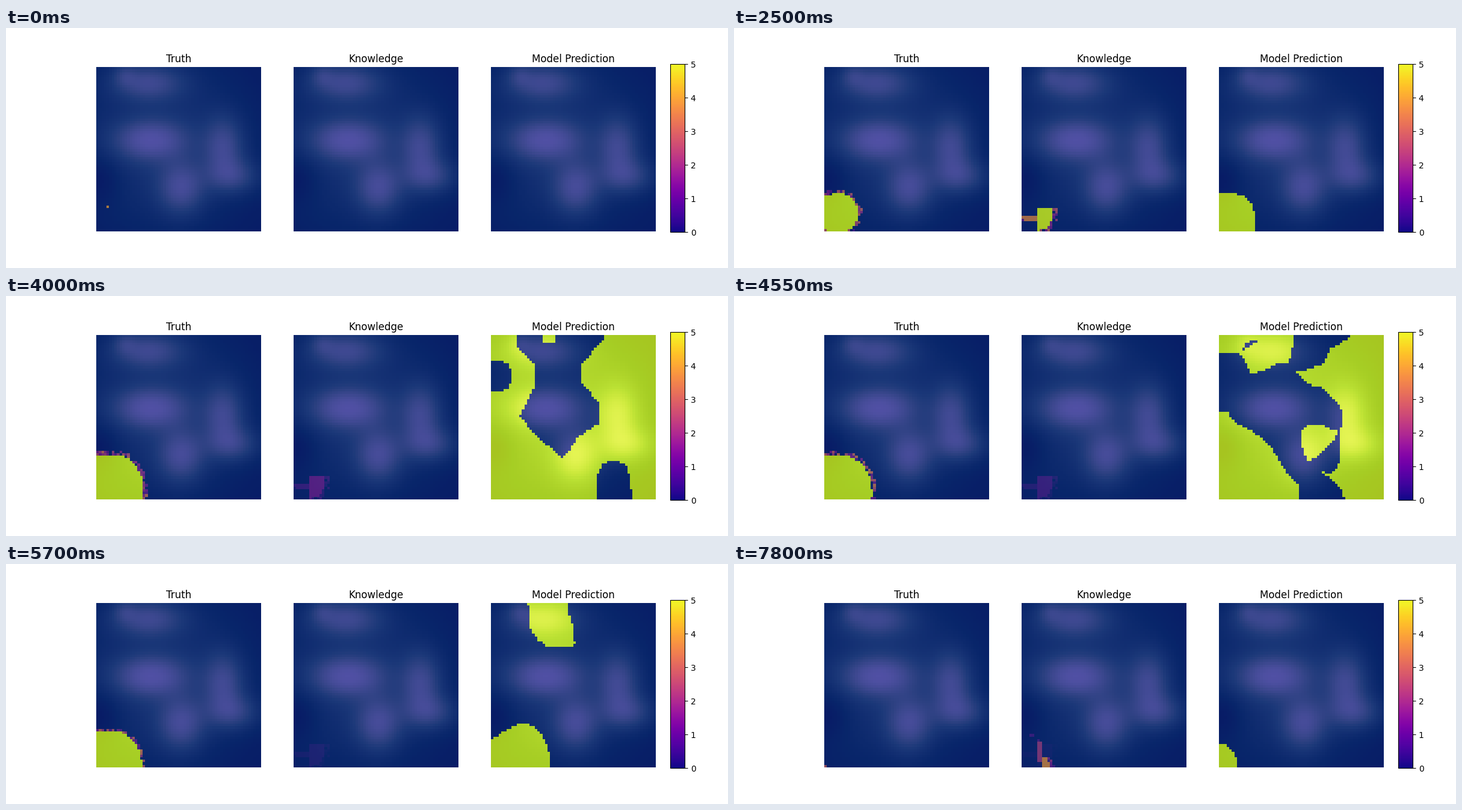
A matplotlib script that plays this animation: 1200 px wide and 400 px high, repeating every 7850 ms.

```python
import numpy as np
import matplotlib.pyplot as plt
from matplotlib.animation import FuncAnimation
from matplotlib.colors import Normalize
from matplotlib.path import Path

SIZE = 64
FRAMES = 157
INTERVAL = 50
MEMORY = 21  # frames until a sensed value has halved
X, Y = np.meshgrid(np.arange(SIZE) + 0.5, np.arange(SIZE) + 0.5)


# Regions are depth fields: positive inside, negative outside, in cells.
def blob(cx, cy, rx, ry, power=2.3):
    q = np.abs((X - cx) / rx) ** power + np.abs((Y - cy) / ry) ** power
    return (1 - q ** (1 / power)) * min(rx, ry)


def outline(*corners):
    corners = np.array(corners, float)
    points = np.column_stack([X.ravel(), Y.ravel()])
    inside = Path(corners).contains_points(points)
    nearest = np.full(len(points), np.inf)
    for a, b in zip(corners, np.roll(corners, -1, axis=0)):
        t = np.clip((points - a) @ (b - a) / ((b - a) @ (b - a)), 0, 1)
        gap = points - a - t[:, None] * (b - a)
        nearest = np.minimum(nearest, np.hypot(*gap.T))
    return np.where(inside, nearest, -nearest).reshape(X.shape)


def union(*regions):
    return np.maximum.reduce(regions)


def all_but(*regions):
    return -union(*regions)


def vegetation():
    def clearing(x, y, w, h, strength):
        return strength * np.exp(-((X - x) / w) ** 2 / 2 - ((Y - y) / h) ** 2 / 2)

    light = (clearing(25, 30, 26, 25, 0.3)
             + clearing(21, 28.5, 9.5, 5.2, 0.63)
             + clearing(20, 6, 9.5, 4.8, 0.5)
             + clearing(11, 3, 3, 3, 0.2)
             + clearing(49.5, 31, 5.3, 8, 0.5)
             + clearing(53, 42.5, 7, 4.6, 0.42)
             + clearing(33, 47, 6, 7, 0.54)
             - clearing(2, 43, 6, 7, 0.14))
    return 1 - np.clip(light, 0, 1)


# Fire outline over time: frame, centre x, centre y, radius x, radius y
FIRE = np.array([
    (0, 4.5, 54.5, 0.6, 0.6),
    (50, 5.3, 56.8, 7.6, 7.6),
    (80, 5, 61, 13.2, 14.4),
    (102, 5, 62, 13.9, 15),
    (128, 2, 64, 14, 11.4),
    (139, 0, 64, 11.7, 6.5),
    (156, 0.5, 63.5, 0.6, 0.6),
])


def truth(frame):
    depth = blob(*(np.interp(frame, FIRE[:, 0], col) for col in FIRE.T[1:]))
    peak = np.interp(frame, [0, 8, 150, 156], [3.5, 5, 5, 2.5])
    fringe = np.interp(frame, [0, 15, 90, 102, 150, 156],
                       [0.1, 1.8, 1.5, 1, 1, 0])
    rng = np.random.default_rng(frame)
    embers = rng.uniform(0.7, 3, X.shape) * (rng.random(X.shape) < 0.65)
    return np.where(depth > 0, peak, np.where(depth > -fringe, embers, 0))


def sweep(frame, c0, c1, r0, r1):
    """What a sensor pass over columns c0..c1, rows r0..r1 picks up."""
    seen = np.zeros((SIZE, SIZE))
    seen[r0:r1, c0:c1] = truth(frame)[r0:r1, c0:c1]
    return frame, seen


SWEEPS = [
    sweep(33, 0, 6, 58, 60), sweep(46, 6, 14, 55, 64),
    sweep(127, 0, 8, 51, 52), sweep(130, 6, 8, 52, 62),
    sweep(140, 8, 13, 60, 64),
]


def knowledge(frame):
    known = np.zeros((SIZE, SIZE))
    for start, seen in SWEEPS:
        if frame >= start:
            fade = 1 / (1 + ((frame - start) / MEMORY) ** 2.5)
            known = np.maximum(known, seen * fade)
    return known


def spread():
    lobe = outline((18, -9), (22, 0), (32, 9.5), (37.8, 16.6), (46.7, 21),
                   (46, 26.5), (30, 30.8), (15, 36), (9, 34), (-9, 33), (-9, -9))
    slope = outline((73, 30.4), (61.7, 30.4), (59.3, 38), (54.6, 44),
                    (45.3, 52.6), (31, 60), (31, 73), (73, 73))
    finger = blob(18, 64, 4.7, 21, 3.5)
    bay = blob(40.5, 0, 6.5, 6, 5)
    return union(all_but(lobe, slope, finger, bay), blob(0, 4, 4, 5.2, 3))


def hourglass():
    waist = outline((10, -9), (10, 4), (16.8, 11), (16.8, 20), (11.2, 32),
                    (19, 40.4), (28, 48.2), (34, 39.5), (42, 34.5),
                    (42, 27), (35, 18), (35.4, 11), (43.6, 1.8), (43.6, -9))
    return union(all_but(waist, blob(0, 16, 7.9, 6, 3), blob(47.6, 64, 7, 15, 2.7)),
                 blob(22.5, 0, 2.7, 3, 3))


def islands():
    top = outline((33, -9), (32.5, 4), (35, 12.8), (39, 17), (37, 19.7),
                  (31, 20), (21, 17.5), (13.5, 11), (10.5, 4), (-9, 4), (-9, -9))
    right = outline((45.3, 7), (48, 7.4), (55.5, 14), (61, 25.5), (73, 22.5),
                    (73, 73), (43.9, 73), (41.3, 54), (48, 48), (54.8, 34),
                    (54, 27), (41.3, 18.5), (43.6, 13))
    return union(top, right, blob(35.4, 37.5, 5.6, 5.6),
                 blob(9.7, 57, 11, 16, 2.6))


def remains():
    bottle = union(blob(23.6, 10.5, 5.4, 5.3, 2.6), blob(23.5, 0, 3.4, 6, 5))
    hill = union(blob(18, 64, 7.9, 11.6), blob(2, 64, 14, 8.6, 3))
    return union(bottle, hill)


corner = blob(0, 64, 14, 15, 3.3)
FORECASTS = [
    (0, corner - 16), (50, corner), (67, spread()), (80, hourglass()),
    (102, islands()), (128, remains()), (156, blob(0, 64, 7, 9, 2.2)),
]


def prediction(frame):
    for (t0, before), (t1, after) in zip(FORECASTS, FORECASTS[1:]):
        if frame <= t1:
            mix = (frame - t0) / (t1 - t0)
            return 5.0 * ((1 - mix) * before + mix * after > 0)


PANELS = [("Truth", truth), ("Knowledge", knowledge),
          ("Model Prediction", prediction)]

fig, axes = plt.subplots(1, 3, figsize=(12, 4), dpi=100)
land = vegetation()
layers = []
for ax, (title, state) in zip(axes, PANELS):
    ax.imshow(land, cmap="Greens", vmin=0, vmax=1)
    layers.append(ax.imshow(state(0), cmap="plasma", vmin=0, vmax=5, alpha=0.7))
    ax.set_title(title)
    ax.axis("off")

scale = plt.cm.ScalarMappable(Normalize(0, 5), cmap="plasma")
fig.colorbar(scale, cax=fig.add_axes([0.92, 0.15, 0.02, 0.7]))


def update(frame):
    for layer, (_, state) in zip(layers, PANELS):
        layer.set_data(state(frame))
    return layers


anim = FuncAnimation(fig, update, frames=FRAMES, interval=INTERVAL,
                     repeat=True, repeat_delay=0, blit=False)
plt.show()
```
